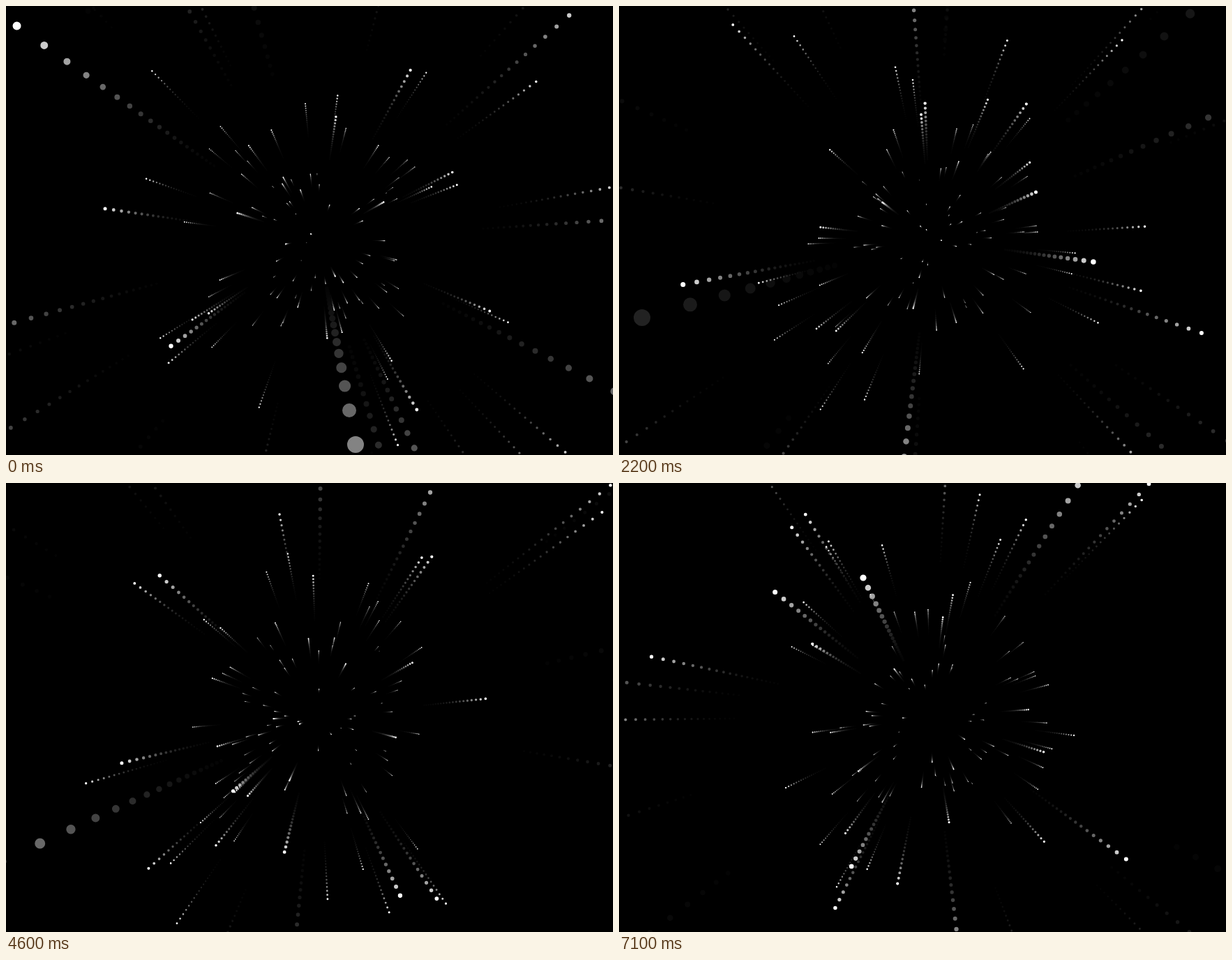
These frames come from a looping animation (870x644 px, 7.2 s). An HTML page with a canvas:

```html
<!DOCTYPE html>
<html lang="en">
<head>
<meta charset="utf-8">
<title>Starfield</title>
<style>
  html, body { margin: 0; width: 100%; height: 100%; overflow: hidden; background: #000; }
  canvas { display: block; }
</style>
</head>
<body>
<canvas id="stage" width="870" height="644"></canvas>
<script>
const W = 870, H = 644, CX = 447, CY = 335;
const STEP = 100, LOOP = 7200, TICKS = 6;   // six ticks pass in every 100 ms step
const DEPTH = 128, SIZE = 60;               // a star lives DEPTH ticks; its radius is SIZE / z
const NEAR = 3200, SPREAD = 12800;          // sideways distance of ordinary stars
const FADE = 0.8, TRAIL = 19;

let seed = 20731;
function random() {
  seed = seed + 0x6D2B79F5 | 0;
  let h = Math.imul(seed ^ seed >>> 15, 1 | seed);
  h = h + Math.imul(h ^ h >>> 7, 61 | h) ^ h;
  return ((h ^ h >>> 14) >>> 0) / 4294967296;
}
const spread = () => (random() * 2 - 1) * SPREAD;

// A star keeps its sideways offset (x, y) and reaches the viewer at tick `end`.
// These few pass close by; all others are scattered at random, one per tick.
const stars = [
  { x: 270, y: 1470, end: 2 },
  { x: -692, y: -560, end: 68 },
  { x: -3785, y: 495, end: 82 },
  { x: -2070, y: 560, end: 128 },
  { x: 1308, y: 100, end: 217 },
  { x: -596, y: -1316, end: 223 },
  { x: -1404, y: -1806, end: 225 },
  { x: -1764, y: 716, end: 343 },
  { x: -2120, y: 536, end: 350 },
  { x: -1261, y: -2587, end: 439 }
];
const last = LOOP / STEP * TICKS + DEPTH;
for (let end = -TRAIL; end < last; end++) {
  let x, y;
  do { x = spread(); y = spread(); } while (Math.hypot(x, y) < NEAR);
  stars.push({ x, y, end });
}

const ctx = document.getElementById("stage").getContext("2d");

function draw(tick) {
  ctx.fillStyle = "#000";
  ctx.fillRect(0, 0, W, H);
  for (let age = TRAIL; age >= 0; age--) {
    const g = Math.round(255 * FADE ** age);
    ctx.fillStyle = `rgb(${g},${g},${g})`;
    ctx.beginPath();
    for (const s of stars) {
      const z = s.end - tick + age;
      if (z < 1 || z > DEPTH) continue;
      const x = CX + s.x / z, y = CY + s.y / z, r = SIZE / z;
      if (x < -r || x > W + r || y < -r || y > H + r) continue;
      ctx.moveTo(x + r, y);
      ctx.arc(x, y, r, 0, Math.PI * 2);
    }
    ctx.fill();
  }
}

const start = performance.now();
let shown = -1;
function play() {
  const t = Math.max(0, performance.now() - start) % LOOP;
  const step = Math.floor(t / STEP);
  if (step !== shown) draw((shown = step) * TICKS);
  requestAnimationFrame(play);
}
play();
</script>
</body>
</html>
```
